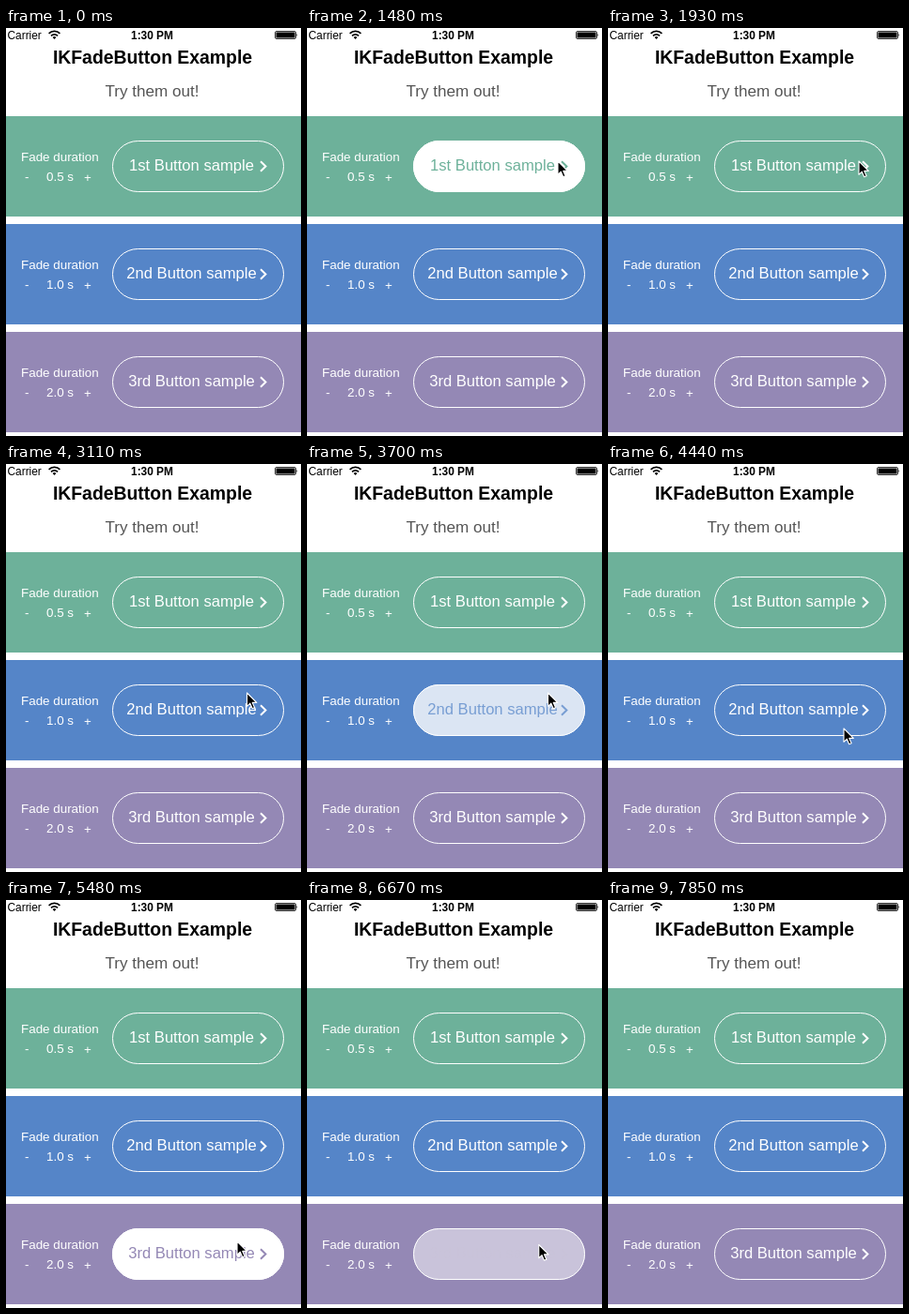
Recreate the animation shown at these times as an HTML page. Size 314 px wide and 435 px high, loop 8390 ms.

```html
<!DOCTYPE html>
<html lang="en">
<head>
<meta charset="utf-8">
<title>IKFadeButton Example</title>
<style>
  html, body { margin: 0; width: 100%; height: 100%; overflow: hidden; background: #fff; }
  svg { display: block; width: 314px; height: 435px; }
  text { font-family: "Liberation Sans", Arial, sans-serif; }
  .mid { text-anchor: middle; }
  .status { font-size: 11.9px; }
  .bold { font-weight: bold; }
  .small { font-size: 13.4px; fill: #fff; }
  .label { font-size: 16.6px; text-anchor: middle; }
</style>
</head>
<body>
<svg viewBox="0 0 314 435">
  <text class="status" x="1.5" y="12">Carrier</text>
  <g fill="none" stroke="#000" stroke-width="1.7">
    <path d="M45.6 5.9a8.2 8.2 0 0 1 11.8 0"/>
    <path d="M48 8.4a4.9 4.9 0 0 1 7 0"/>
  </g>
  <path d="M49.6 10a2.7 2.7 0 0 1 3.8 0L51.5 12Z"/>
  <text class="status bold mid" x="155.5" y="12">1:30 PM</text>
  <rect x="286.5" y="3.5" width="22" height="8" rx="1.5" fill="none" stroke="#000" stroke-width=".8"/>
  <rect x="287.5" y="4.5" width="20" height="6" rx=".5"/>
  <path d="M309.5 6q1.6 1.5 0 3Z"/>
  <text class="bold mid" x="156" y="38" font-size="19.4">IKFadeButton Example</text>
  <text class="mid" x="155.5" y="73" font-size="17.1" fill="#555">Try them out!</text>
  <g id="rows"></g>
  <path id="cursor" d="M0 0V14.3L3.3 11.2L5.7 16.8L8.1 15.8L5.7 10.4H10.3Z"
        stroke="#fff" stroke-width="1.1" stroke-linejoin="round"/>
</svg>
<script>
const LOOP = 8390, TICK = 148.1; // the screen refreshes once per tick

// press, fade start and fade end are in ticks
const rows = [
  { color: '#6db19a', name: '1st', seconds: '0.5', press: 10, fade: 10, end: 13 },
  { color: '#5585c8', name: '2nd', seconds: '1.0', press: 23, fade: 23, end: 29.75 },
  { color: '#9488b5', name: '3rd', seconds: '2.0', press: 37, fade: 41, end: 49 }
];

// tick, x, y of the pointer tip
const path = [
  [3, 320, 153], [7, 267, 142], [14, 267, 142], [21, 256.5, 244],
  [27, 256.5, 244], [30, 251, 282], [34, 246, 364], [39, 246, 364],
  [40, 244.5, 364], [41, 244.5, 364], [49, 249, 371], [53, 266, 440]
];

const face = (row, color) => `
  <text class="label" x="197.5" y="58" fill="${color}">${row.name} Button sample</text>
  <path d="M271 48.2l5.4 5.3l-5.4 5.3" fill="none" stroke="${color}" stroke-width="2"/>`;

const pill = fill =>
  `<rect x="113.5" y="26.5" width="182" height="54" rx="27" fill="${fill}" stroke="#fff"/>`;

document.getElementById('rows').innerHTML = rows.map((row, i) => `
  <g transform="translate(0 ${94 + i * 115})">
    <rect width="314" height="107" fill="${row.color}"/>
    <text class="small" x="16" y="48">Fade duration</text>
    <text class="small" x="20" y="69">-</text>
    <text class="small" x="43" y="69">${row.seconds} s</text>
    <text class="small" x="83" y="70">+</text>
    ${pill('none')}${face(row, '#fff')}
    <g class="lit">${pill('#fff')}${face(row, row.color)}</g>
  </g>`).join('');

const lit = document.querySelectorAll('.lit');
const cursor = document.getElementById('cursor');

const ease = p => {
  p = Math.min(1, Math.max(0, p));
  return p * p * (3 - 2 * p);
};

function pointerAt(tick) {
  const next = path.findIndex(key => key[0] > tick);
  if (next < 1) return [320, 440];
  const [t0, x0, y0] = path[next - 1], [t1, x1, y1] = path[next];
  const p = ease((tick - t0) / (t1 - t0));
  return [x0 + (x1 - x0) * p, y0 + (y1 - y0) * p];
}

function draw(ms) {
  const tick = Math.floor(ms / TICK + 0.1);
  rows.forEach((row, i) => {
    const glow = tick < row.press ? 0 : 1 - ease((tick - row.fade) / (row.end - row.fade));
    lit[i].setAttribute('opacity', glow);
  });
  cursor.setAttribute('transform', `translate(${pointerAt(tick)})`);
}

const start = performance.now();
function frame() {
  draw((performance.now() - start) % LOOP);
  requestAnimationFrame(frame);
}
frame();
</script>
</body>
</html>
```
